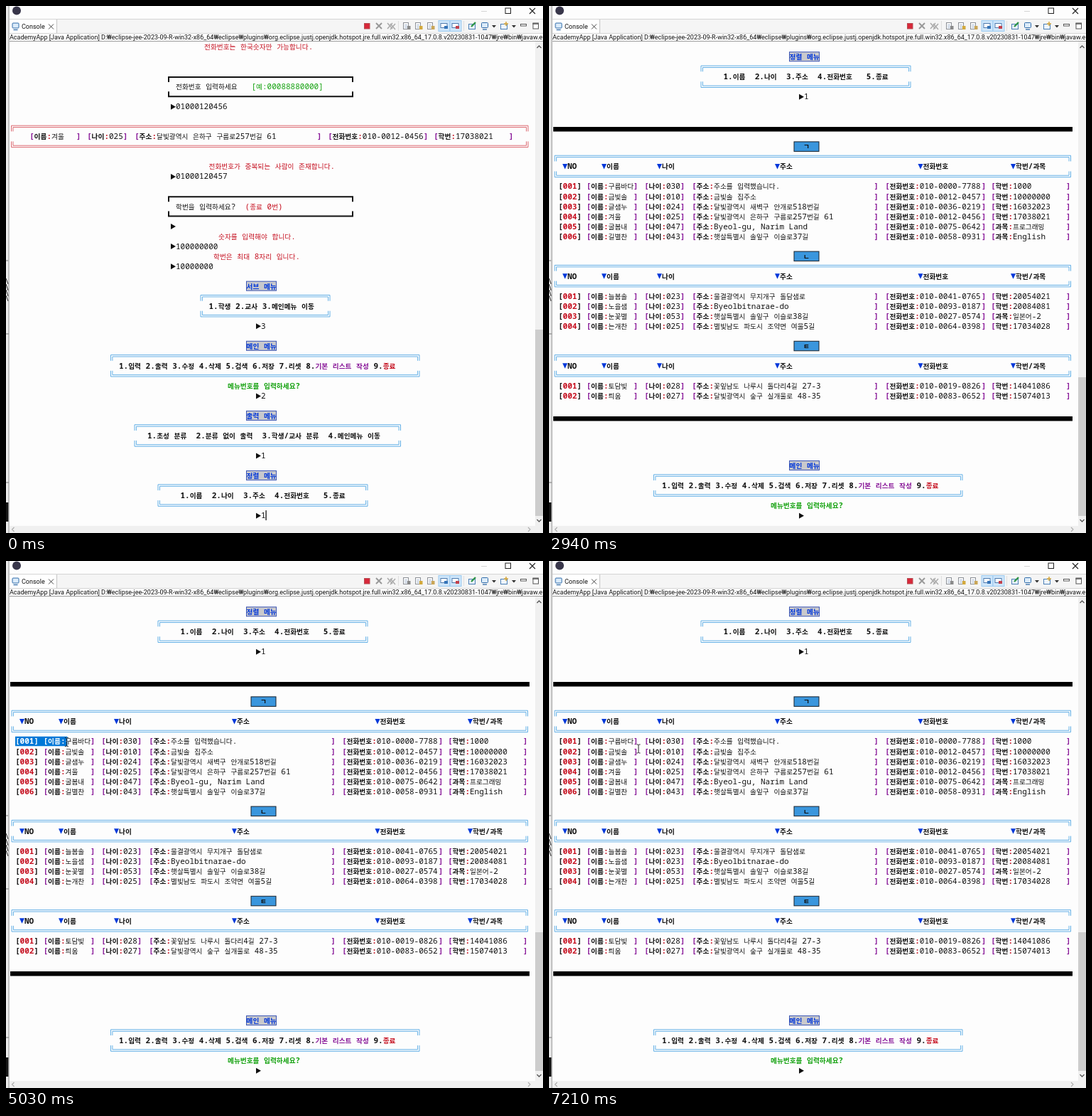
An HTML page for the animation above (7240 ms loop, 756 by 741 pixels).

```html
<!DOCTYPE html>
<html lang="ko">
<head>
<meta charset="utf-8">
<title>Console</title>
<style>
html, body { margin: 0; width: 100%; height: 100%; overflow: hidden; background: #fdfdfd; }
svg { display: block; width: 100%; height: 100%; }
text { font-family: "Noto Sans Mono", "DejaVu Sans Mono", monospace; font-size: 11px; }
.ko { font-family: "Noto Sans CJK KR", "Noto Sans CJK", sans-serif; font-size: 9.67px; }
.ui { font-family: Roboto, "Noto Sans CJK KR", sans-serif; font-size: 9px; }
.sel tspan { fill: #fff; }
</style>
</head>
<body>
<svg id="stage" viewBox="0 0 756 741"></svg>
<script>
const LOOP = 7240;
const RED = '#c50f1f', GREEN = '#13a10e', BLUE = '#0037da', PURPLE = '#881798';
const SKY = '#3a96dd', BLACK = '#111';
const ASCII_W = 6.6, HANGUL_W = 8.9;
const stage = document.getElementById('stage');

function add(parent, tag, attrs = {}, content) {
  const el = document.createElementNS('http://www.w3.org/2000/svg', tag);
  for (const key in attrs) el.setAttribute(key, attrs[key]);
  if (content) el.textContent = content;
  parent.appendChild(el);
  return el;
}
const rect = (p, x, y, width, height, fill, more) =>
  add(p, 'rect', { x, y, width, height, fill, ...more });
const line = (p, d, stroke, width = 1, more) =>
  add(p, 'path', { d, stroke, 'stroke-width': width, fill: 'none', ...more });
const shape = (p, d, fill) => add(p, 'path', { d, fill });
const show = (el, on) => el.setAttribute('visibility', on ? 'visible' : 'hidden');

// Console grid: row number to vertical centre
const rowY = k => 57.2 + 14.02 * k;
const isHangul = s => /[ㄱ-힣]/.test(s);

// Writes [text, colour, bold] parts on the console grid, returns the end x
function write(p, x, k, ...parts) {
  const text = add(p, 'text', { y: rowY(k) + 4 });
  for (const [str, fill = BLACK, bold] of parts) {
    for (const run of str.match(/[ㄱ-힣]+|[^ㄱ-힣\s]+|\s+/g)) {
      const ko = isHangul(run);
      if (run.trim()) {
        add(text, 'tspan', { x: x.toFixed(2), fill, 'font-weight': bold ? 700 : 400, class: ko ? 'ko' : 'en' }, run);
      }
      x += run.length * (ko ? HANGUL_W : ASCII_W);
    }
  }
  return x;
}

function doubleBox(p, x1, x2, k, color = '#62afe6') {
  const top = rowY(k), bottom = rowY(k + 2);
  for (const d of [-1.2, 1.2]) {
    const l = x1 + 1.2 + d, r = x2 - 1.2 - d;
    line(p, `M${l} ${top + 7}V${top + d}H${r}V${top + 7}M${l} ${bottom - 7}V${bottom - d}H${r}V${bottom - 7}`, color, 1);
  }
}

function heavyBox(p, k) {
  const top = rowY(k) + .7, bottom = rowY(k + 2);
  line(p, `M229 ${top + 7}V${top}H488V${top + 7}M229 ${bottom - 7}V${bottom}H488V${bottom - 7}`, BLACK, 2);
}

function prompt(p, x, k, str = '') {
  const y = rowY(k);
  shape(p, `M${x} ${y - 3.5}L${x + 7} ${y + .5}L${x} ${y + 4.5}Z`, BLACK);
  if (str) write(p, x + 7, k, [str]);
}

function title(p, k, str) {
  rect(p, 338.5, rowY(k) - 6.5, 42, 13, '#c9c9cc', { stroke: '#3b55b4' });
  write(p, 338.5, k, [str, BLUE, 1]);
}

function mainMenu(p, k) {
  title(p, k, '메인 메뉴');
  doubleBox(p, 147.5, 582, k + 1);
  write(p, 159, k + 2,
    ['1.입력 2.출력 3.수정 4.삭제 5.검색 6.저장 7.리셋 8.', BLACK, 1],
    ['기본 리스트 작성', PURPLE, 1], [' 9.', BLACK, 1], ['종료', RED, 1]);
  write(p, 312, k + 4, ['메뉴번호를 입력하세요?', GREEN, 1]);
}

function sortMenu(p, k) {
  title(p, k, '정렬 메뉴');
  doubleBox(p, 214, 509, k + 1);
  write(p, 245.5, k + 2, ['1.이름  2.나이  3.주소  4.전화번호   5.종료', BLACK, 1]);
  prompt(p, 352, k + 4, '1');
}

function field(p, x, k, label, value, end) {
  write(p, x, k, ['[', PURPLE, 1], [label, BLACK, 1], [':', RED, 1], [value]);
  write(p, end, k, [']', PURPLE, 1]);
}

function record(p, k, no, [name, age, home, phone, code]) {
  write(p, 13, k, ['[', BLACK, 1], ['00' + no, RED, 1], [']', BLACK, 1]);
  field(p, 52.5, k, '이름', name, 119);
  field(p, 134, k, '나이', age, 185);
  field(p, 201, k, '주소', home, 457.5);
  field(p, 473, k, '전화번호', phone, 609);
  field(p, 622, k, /^\d+$/.test(code) ? '학번' : '과목', code, 728);
}

const HEADS = [[19, 'NO'], [74, '이름'], [152, '나이'], [318, '주소'], [519.5, '전화번호'], [650, '학번/과목']];

function section(p, k, letter, records) {
  const y = rowY(k);
  rect(p, 345, y - 6.5, 35, 13.5, SKY, { stroke: '#16202a' });
  write(p, 358, k, [letter, BLACK, 1]);
  doubleBox(p, 8, 734.5, k + 1);
  for (const [x, label] of HEADS) {
    const h = rowY(k + 2);
    shape(p, `M${x} ${h - 3.5}H${x + 7}L${x + 3.5} ${h + 4}Z`, BLUE);
    write(p, x + 7, k + 2, [label, BLACK, 1]);
  }
  records.forEach((r, i) => record(p, k + 4 + i, i + 1, r));
}

const GROUPS = [
  [10, 'ㄱ', [
    ['구름바다', '030', '주소를 입력했습니다.', '010-0000-7788', '1000'],
    ['금빛솔', '010', '금빛솔 집주소', '010-0012-0457', '10000000'],
    ['글샘누', '024', '달빛광역시 새벽구 안개로518번길', '010-0036-0219', '16032023'],
    ['겨울', '025', '달빛광역시 은하구 구름로257번길 61', '010-0012-0456', '17038021'],
    ['굴봄내', '047', 'Byeol-gu, Narim Land', '010-0075-0642', '프로그래밍'],
    ['길별찬', '043', '햇살특별시 솔잎구 이슬로37길', '010-0058-0931', 'English']]],
  [21, 'ㄴ', [
    ['늘봄솔', '023', '물결광역시 무지개구 돌담샘로', '010-0041-0765', '20054021'],
    ['노을샘', '023', 'Byeolbitnarae-do', '010-0093-0187', '20084081'],
    ['눈꽃별', '053', '햇살특별시 솔잎구 이슬로38길', '010-0027-0574', '일본어-2'],
    ['는개찬', '025', '별빛남도 파도시 조약면 여울5길', '010-0064-0398', '17034028']]],
  [30, 'ㅌ', [
    ['토담빛', '028', '꽃잎남도 나루시 돌다리4길 27-3', '010-0019-0826', '14041086'],
    ['틔움', '027', '달빛광역시 숲구 실개울로 48-35', '010-0083-0652', '15074013']]]
];

function drawInput(p) {
  write(p, 279, 0, ['전화번호는 한국숫자만 가능합니다.', RED]);
  heavyBox(p, 3);
  write(p, 239, 4, ['전화번호 입력하세요   '], ['[예:00088880000]', GREEN]);
  prompt(p, 232, 6, '01000120456');

  doubleBox(p, 7.5, 735, 8, '#dc6870');
  field(p, 33, 9, '이름', '겨울', 99);
  field(p, 114, 9, '나이', '025', 165);
  field(p, 181, 9, '주소', GROUPS[0][2][3][2], 438);
  field(p, 453, 9, '전화번호', '010-0012-0456', 588);
  field(p, 602, 9, '학번', '17038021', 708);

  write(p, 285.5, 12, ['전화번호가 중복되는 사람이 존재합니다.', RED]);
  prompt(p, 232, 13, '01000120457');
  heavyBox(p, 15);
  write(p, 239, 16, ['학번을 입력하세요?  '], ['(종료 0번)', RED]);
  prompt(p, 232, 18);
  write(p, 299, 19, ['숫자를 입력해야 합니다.', RED]);
  prompt(p, 232, 20, '100000000');
  write(p, 292, 21, ['학번은 최대 8자리 입니다.', RED]);
  prompt(p, 232, 22, '10000000');

  title(p, 24, '서브 메뉴');
  doubleBox(p, 274, 456, 25);
  write(p, 285.5, 26, ['1.학생 2.교사 3.메인메뉴 이동', BLACK, 1]);
  prompt(p, 352, 28, '3');
  mainMenu(p, 30);
  prompt(p, 352, 35, '2');
  title(p, 37, '출력 메뉴');
  doubleBox(p, 181, 555.5, 38);
  write(p, 199, 39, ['1.초성 분류  2.분류 없이 출력  3.학생/교사 분류  4.메인메뉴 이동', BLACK, 1]);
  prompt(p, 352, 41, '1');
  sortMenu(p, 43);
}

function drawList(p) {
  sortMenu(p, 1);
  for (const k of [8, 37]) rect(p, 6, Math.round(rowY(k)) + 1, 731, 6.5, '#000');
  for (const g of GROUPS) section(p, ...g);
  mainMenu(p, 42);
  prompt(p, 352, 47);
}

function monitor(p, x, y) {
  rect(p, x - 4.5, y - 4.5, 9, 7, '#dcecfa', { stroke: '#2f6aa8', rx: 1 });
  line(p, `M${x - 3} ${y + 5}h6`, '#2f6aa8', 1.3);
}

function page(p, x, accent) {
  rect(p, x - 4.5, 23.5, 7, 9, '#fff', { stroke: '#8b8f96' });
  line(p, `M${x - 3} 26.5h4M${x - 3} 28.5h4M${x - 3} 30.5h4`, '#9fb2cc', .8);
  rect(p, x + 1, 28, 4.5, 5, accent);
}

function drawWindow(p) {
  rect(p, 0, 0, 756, 741, '#fdfdfd');
  // Sliver of what lies behind the window
  rect(p, 0, 0, 4, 741, '#ececec');
  line(p, 'M0 358h3M0 461h4M0 670h4', '#777');
  line(p, 'M0 383l3 8M0 391l3 9M0 399l3 9M0 407l3 8', '#222', 1);
  rect(p, 0, 698, 3.5, 27, '#151515');
  line(p, 'M4 0V741', '#8e8e8e');

  add(p, 'circle', { cx: 15, cy: 6.5, r: 6, fill: '#38364a' });
  line(p, 'M669 7.5h8', '#d4d4d4');
  rect(p, 703, 3, 7.5, 7.5, 'none', { stroke: '#222' });
  line(p, 'M737 3l8 8M745 3l-8 8', '#222', 1.1);

  rect(p, 5, 18, 751, 20, '#f5f5f5');
  rect(p, 5, 18, 66, 20, '#fff');
  line(p, 'M5 18.5H756M5 38.5H756', '#d5d5d5');
  line(p, 'M71.5 19V38', '#c4c4c4');
  monitor(p, 13.5, 28.5);
  add(p, 'text', { x: 22, y: 32, class: 'ui', fill: BLACK }, 'Console');
  line(p, 'M60 25.5l7 7M67 25.5l-7 7', '#444', 1);

  rect(p, 504.5, 24.5, 7.5, 7.5, '#d8283a', { stroke: '#b64a50' });
  line(p, 'M521 24l8 8M529 24l-8 8', '#999', 2);
  line(p, 'M537 24l7 8M544 24l-7 8M541 25l7 8M548 25l-7 8', '#aaa', 1.5);
  line(p, 'M552.5 21v14M644.5 21v14', '#dedede');
  page(p, 564, '#8a8a8a');
  page(p, 581, '#d3a93c');
  page(p, 598, '#c9a657');
  for (const [x, c] of [[617, '#3574b8'], [633, '#c2414c']]) {
    rect(p, x - 8, 20.5, 16, 15, '#cfe6fa', { stroke: '#9bcaf0' });
    rect(p, x - 5, 24.5, 9, 6, '#fff', { stroke: '#4d79ad' });
    rect(p, x, 28, 5, 4, c);
  }
  rect(p, 651.5, 25.5, 9, 7, '#e9f1fa', { stroke: '#4c7fb5' });
  line(p, 'M655 29l6-6', '#2f9548', 2.4);
  monitor(p, 674, 28);
  rect(p, 696.5, 25.5, 9, 7, '#eef5fc', { stroke: '#4c7fb5' });
  line(p, 'M704 22v6M701 25h6', '#d6a63a', 1.5);
  for (const x of [687, 715]) shape(p, `M${x - 3} 27h6l-3 3.5Z`, '#333');
  rect(p, 724.5, 25.5, 8, 2.5, '#fff', { stroke: '#555' });
  rect(p, 742, 24, 7.5, 8, '#fff', { stroke: '#555' });
  line(p, 'M741.5 25h8.5', '#555', 1.5);

  add(p, 'text', { x: 5, y: 46.5, class: 'ui', fill: BLACK },
    'AcademyApp [Java Application] D:₩eclipse-jee-2023-09-R-win32-x86_64₩eclipse₩plugins₩' +
    'org.eclipse.justj.openjdk.hotspot.jre.full.win32.x86_64_17.0.8.v20230831-1047₩jre₩bin₩javaw.e');
  line(p, 'M5 49.5H756', '#9b9b9b');

  rect(p, 745, 50, 11, 681, '#f0f0f0');
  rect(p, 5, 731, 751, 10, '#f0f0f0');
  line(p, 'M747.5 59l3-3l3 3M747.5 722l3 3l3-3', '#555', 1.3);
  line(p, 'M11.5 733l-3 3l3 3M735 733l3 3l-3 3', '#aaa', 1.1);
}

drawWindow(stage);
const thumb = rect(stage, 745, 455, 11, 262, '#cdcdcd');
const input = add(stage, 'g');
const list = add(stage, 'g');
drawInput(input);
drawList(list);

const SEL_X = 13, SEL_END = 126;
const clip = rect(add(stage, 'clipPath', { id: 'pick' }), SEL_X, 246.5, 0, 14, '#000');
const picked = add(stage, 'g', { class: 'sel', 'clip-path': 'url(#pick)' });
rect(picked, SEL_X, 246.5, SEL_END - SEL_X, 14, '#0078d7');
record(picked, 14, 1, GROUPS[0][2][0]);

const caret = rect(stage, 0, 0, 1.2, 14, '#000');
const pointer = line(stage, 'M-2.5 -6H-.8L0 -5.2L.8 -6H2.5M0 -5.2V5.2M-2.5 6H-.8L0 5.2L.8 6H2.5', '#222', 1);

// Pointer stops: time, x, y
const PATH = [[2950, 300, 748], [3560, 112, 296], [3680, 112, 296], [4280, 17, 257],
  [4560, 17, 257], [5380, 129, 253], [6350, 129, 253], [6600, 126, 264]];
const DRAG = 4560, RELEASE = 6600;

function pointerAt(t) {
  const i = PATH.findIndex(stop => stop[0] > t);
  if (i < 0) return PATH[PATH.length - 1].slice(1);
  const [t0, x0, y0] = PATH[Math.max(0, i - 1)], [t1, x1, y1] = PATH[i];
  const u = t1 > t0 ? (t - t0) / (t1 - t0) : 0, e = u * u * (3 - 2 * u);
  return [x0 + (x1 - x0) * e, y0 + (y1 - y0) * e];
}

function placeCaret(t) {
  let x = 5.5, k = 6, on = t >= 1000 && t < DRAG && (t - 1000) % 1060 < 480;
  if (t < 60) [x, k, on] = [365.5, 47, true];
  if (t >= RELEASE) [x, k, on] = [SEL_END, 14, t < RELEASE + 480];
  caret.setAttribute('x', x);
  caret.setAttribute('y', rowY(k) - 7);
  show(caret, on);
}

function draw(t) {
  const listed = t >= 60;
  show(input, !listed);
  show(list, listed);
  const top = listed ? 522 : 455;
  thumb.setAttribute('y', top);
  thumb.setAttribute('height', 717 - top);

  const [x, y] = pointerAt(t);
  show(pointer, t >= PATH[0][0]);
  pointer.setAttribute('transform', `translate(${x.toFixed(1)} ${y.toFixed(1)})`);

  const selecting = t >= DRAG && t < RELEASE;
  const cells = Math.round((Math.min(x, SEL_END) - SEL_X) / ASCII_W);
  show(picked, selecting);
  clip.setAttribute('width', selecting ? Math.min(SEL_END - SEL_X, Math.max(0, cells * ASCII_W + .8)) : 0);
  placeCaret(t);
}

const start = performance.now();
function tick() {
  draw((performance.now() - start) % LOOP);
  requestAnimationFrame(tick);
}
draw(0);
requestAnimationFrame(tick);
</script>
</body>
</html>
```
